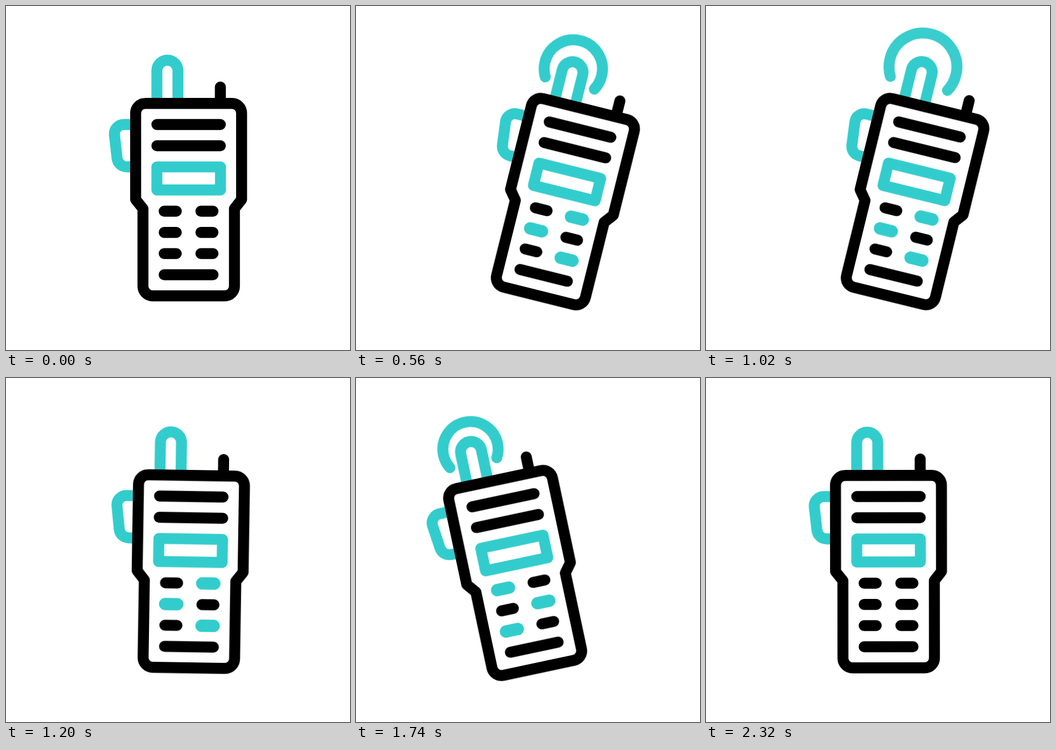
These frames come from a looping animation (640 by 640 pixels, 2400 ms). An HTML page:

```html
<!DOCTYPE html>
<html lang="en">
<head>
<meta charset="utf-8">
<title>Walkie-talkie</title>
<style>
  :root { --ease: cubic-bezier(.333, 0, .667, 1); --loop: 2400ms; }
  html, body { margin: 0; width: 100%; height: 100%; overflow: hidden; background: #fff; }
  svg { display: block; width: 640px; height: 640px; }
  svg * { fill: none; }
  .ink, .teal { stroke-width: 20.4; stroke-linecap: round; stroke-linejoin: round; }
  .ink { stroke: #000; }
  .teal { stroke: #33cccc; }
  .lit { stroke-width: 23; }

  #radio { transform-origin: 339.7px 539px; animation: swing var(--loop) var(--ease) infinite; }
  #signal { animation: signal var(--loop) step-end infinite; }
  #wave {
    stroke-dasharray: 240 120;
    stroke-dashoffset: -150;
    animation: grow 400ms var(--ease) infinite, fade 400ms var(--ease) infinite;
  }
  #keysA { animation: keysA var(--loop) step-end infinite; }
  #keysB { animation: keysB var(--loop) step-end infinite; }

  @keyframes swing {
    0%, 4.1667% { transform: rotate(0deg); }
    18.0556%, 41.6667% { transform: rotate(14deg); }
    58.3333%, 83.3333% { transform: rotate(-12deg); }
    97.2222%, 100% { transform: rotate(0deg); }
  }
  @keyframes grow {
    from { r: 40px; cy: 119.5px; }
    to { r: 80px; cy: 103.9px; }
  }
  @keyframes fade {
    0%, 100% { opacity: 0; }
    30%, 50% { opacity: 1; }
  }
  @keyframes signal {
    0%, 83.3333% { visibility: hidden; }
    16.6667% { visibility: visible; }
  }
  @keyframes keysA {
    0%, 50.4167% { visibility: hidden; }
    17.0833% { visibility: visible; }
  }
  @keyframes keysB {
    0%, 83.75% { visibility: hidden; }
    50.4167% { visibility: visible; }
  }
</style>
</head>
<body>
<svg viewBox="0 0 640 640">
  <g id="radio">
    <g id="signal">
      <circle id="wave" class="teal" cx="300.3" cy="119.5" r="40" pathLength="360"/>
    </g>

    <!-- antenna, side clip, screen -->
    <g class="teal">
      <path d="M280.7 178V120.3a19.6 19.6 0 0 1 39.2 0V178"/>
      <path d="M241 220.5H219.5C208.5 220.5 200.6 229.5 201.8 240L206.6 283C207.7 292.3 215 299.2 224.3 299.2H241"/>
      <path d="M280.7 299.4H399V342.3H280.7Z"/>
    </g>

    <!-- body, knob, speaker bars, keypad -->
    <g class="ink">
      <path d="M259 181.2H420.3a18 18 0 0 1 18 18V360L425 377V521.3a18 18 0 0 1 -18 18H272.8a18 18 0 0 1 -18 -18V377L241.2 360V199.2a18 18 0 0 1 18 -18Z"/>
      <path d="M398.8 181V150.8"/>
      <path d="M280.7 220.5H398.8M280.7 260H398.8"/>
      <path d="M294.3 381.8h22.5M362.6 381.8h22.5M294.3 421.2h22.5M362.6 421.2h22.5M294.3 460.6h22.5M362.6 460.6h22.5M294.3 500H385.2"/>
    </g>
    <path id="keysA" class="teal lit" d="M362.6 381.8h22.5M294.3 421.2h22.5M362.6 460.6h22.5"/>
    <path id="keysB" class="teal lit" d="M294.3 381.8h22.5M362.6 421.2h22.5M294.3 460.6h22.5"/>
  </g>
</svg>
</body>
</html>
```
